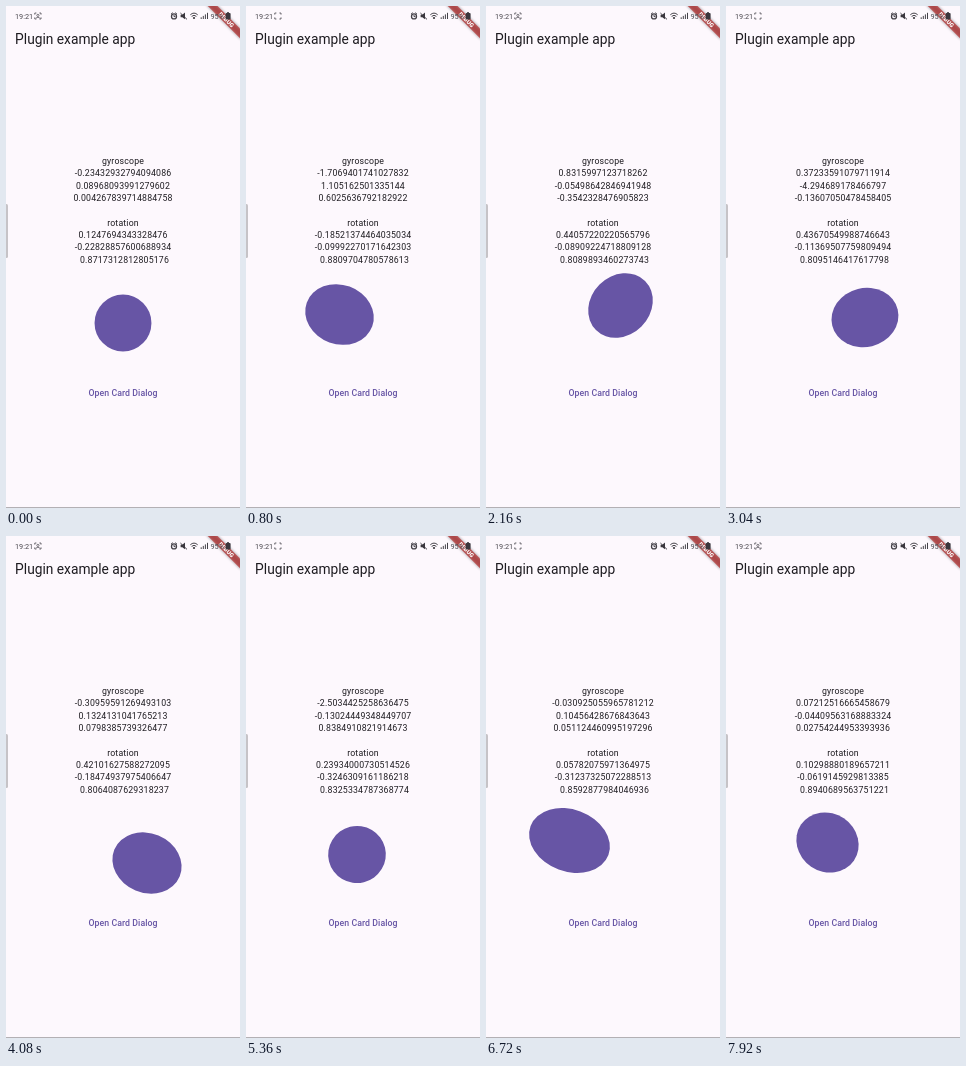
Animation, 234 px wide and 502 px high, one loop 8000 ms. Source, as an HTML page:

```html
<!DOCTYPE html>
<html lang="en">
<head>
<meta charset="utf-8">
<title>Plugin example app</title>
<style>
  html, body { margin: 0; width: 100%; height: 100%; overflow: hidden; background: #fdf8fd; }
  svg { display: block; width: 100vw; height: 100vh; font-family: Roboto, "Liberation Sans", sans-serif; }
  .body { font-size: 8.76px; letter-spacing: .17px; text-anchor: middle; fill: #1d1b20; }
  .status { font-size: 7.3px; fill: #4b484f; }
  .icon { fill: none; stroke: #454249; stroke-width: 1; }
  .solid { fill: #3a373d; }
</style>
</head>
<body>
<svg viewBox="0 0 234 502">
  <defs>
    <filter id="soft" x="-20%" y="-80%" width="140%" height="260%"><feGaussianBlur stdDeviation="1.5"/></filter>
  </defs>
  <rect width="234" height="502" fill="#fdf8fd"/>

  <text x="9.1" y="37.7" font-size="13.77" fill="#1d1b20">Plugin example app</text>
  <g id="lines"></g>
  <circle id="ball" r="28.45" fill="#6755a5"/>
  <text x="117" y="390.4" font-size="8.76" font-weight="500" letter-spacing=".057" text-anchor="middle" fill="#6755a5">Open Card Dialog</text>

  <!-- corner ribbon -->
  <g transform="translate(234 0) rotate(45)">
    <rect x="-24" y="15.9" width="48" height="6.9" opacity=".4" filter="url(#soft)"/>
    <rect x="-24" y="15.9" width="48" height="6.9" fill="#b71c1c" opacity=".63"/>
    <text y="21.4" font-size="5.8" font-weight="900" text-anchor="middle" fill="#fff">DEBUG</text>
  </g>

  <!-- status bar, above the app -->
  <text class="status" x="9" y="12.7">19:21</text>
  <text class="status" x="204.4" y="12.7">95%</text>
  <g class="icon">
    <path d="M30.4 7H28.8V8.6M28.8 11.4V13H30.4M33.4 7H35V8.6M35 11.4V13H33.4" stroke-width=".8"/>
    <g id="rec" stroke-width=".7"><circle cx="31.9" cy="9.4" r="1.1"/><path d="M30 12Q31.9 10.6 33.8 12"/></g>
    <circle cx="168" cy="10.4" r="2.5" stroke-width="1.3"/>
    <path d="M168 9V10.6H169.4M165 8.2L166.7 6.7M171 8.2L169.3 6.7M174.4 7L181 13.4"/>
    <path d="M184.3 8.8Q188 5.4 191.7 8.8M185.6 10.4Q188 8.2 190.4 10.4"/>
    <path d="M195.2 13V11.3M197.3 13V9.9M199.4 13V8.4M201.5 13V6.8"/>
  </g>
  <g class="solid">
    <path d="M174.6 8.8H176.3L179 6.6V13.2L176.3 11.2H174.6Z"/>
    <circle cx="188" cy="12" r="1.1"/>
    <rect x="219.6" y="7" width="5" height="6.4" rx="1"/>
    <rect x="221" y="6.2" width="2" height="1"/>
  </g>

  <rect x="-2" y="198" width="4" height="54" rx="1.5" fill="#c6c3c7"/>
  <rect y="501" width="234" height="1" fill="#b3b0b4"/>
</svg>
<script>
const LOOP = 8000, STEP = 80;
const X = 1, Y = 2, TILT_X = 3, TILT_Y = 4;

// time, ball offset x y, tilt x y; the phone rests from 4800 to 5120
const keys = [
  [0, 0, 0, .125, -.228],
  [800, -23.5, -8.5, -.185, -.1],
  [1200, -28, -10, -.2, -.09],
  [2160, 17.5, -17.5, .441, -.089],
  [4080, 24, 10, .421, -.185],
  [4800, 0, 0, .3, -.32],
  [5120, 0, 0, .3, -.32],
  [5360, -6, 1.5, .239, -.325],
  [6720, -33.5, -12.5, .058, -.312],
  [7920, -15.5, -10.5, .103, -.062]
];

const svgNS = 'http://www.w3.org/2000/svg';
const ball = document.getElementById('ball');
const rec = document.getElementById('rec');
const lines = document.getElementById('lines');

function addLine(row, text = '', shift = 0) {
  const el = document.createElementNS(svgNS, 'text');
  el.setAttribute('class', 'body');
  el.setAttribute('x', 117 + shift);
  el.setAttribute('y', 158 + row * 12.33);
  el.textContent = text;
  lines.append(el);
  return el;
}

addLine(0, 'gyroscope');
addLine(5, 'rotation');
const fields = [1, 2, 3, 6, 7, 8].map(row => addLine(row, '', row === 8 ? 1.5 : 0));

function noise(n, i) {
  const v = Math.sin(n * 12.9898 + i * 78.233) * 43758.5453;
  return (v - Math.floor(v)) * 2 - 1;
}

// slope at a key, flat at turning points
function slope(i, c) {
  const a = keys[i - 1], b = keys[i], d = keys[i + 1];
  if (!a || !d) return 0;
  const s0 = (b[c] - a[c]) / (b[0] - a[0]), s1 = (d[c] - b[c]) / (d[0] - b[0]);
  return s0 * s1 <= 0 ? 0 : 2 * s0 * s1 / (s0 + s1);
}

function curve(t, c) {
  const next = keys.findIndex(k => k[0] > t);
  const i = next < 0 ? keys.length - 2 : Math.max(0, next - 1);
  const a = keys[i], b = keys[i + 1], h = b[0] - a[0];
  const u = Math.min(1, Math.max(0, (t - a[0]) / h)), v = 1 - u;
  return a[c] * (1 + 2 * u) * v * v + b[c] * u * u * (3 - 2 * u)
    + h * u * v * (v * slope(i, c) - u * slope(i + 1, c));
}

const rate = (t, c) => (curve(t + STEP / 2, c) - curve(t - STEP / 2, c)) / STEP;

// turning speed follows the ball; both readings carry sensor jitter
function readings(t) {
  const x = curve(t, TILT_X), y = curve(t, TILT_Y);
  const spin = rate(t, X) * 100;
  const gyro = [spin, rate(t, Y) * -200, spin * -.35];
  const tilt = [x, y, .9 - .45 * x * x - .4 * y * y];
  return [...gyro, ...tilt].map((v, i) =>
    Math.fround(v + noise(t / STEP, i) * (i < 3 ? .06 : .0005)));
}

function moveBall(t) {
  const x = curve(t, X), y = curve(t, Y), d = x * x + y * y;
  const angle = Math.atan2(y, x) * 180 / Math.PI;
  ball.setAttribute('transform',
    `translate(${117 + x} ${317 + y}) rotate(${angle}) scale(${1 + d * .00036} ${1 + d * .00007})`);
}

function draw() {
  const t = Math.floor(performance.now() % LOOP / STEP) * STEP;
  const resting = t > 4800 && t < 5120;
  const shown = readings(resting ? 4960 - (t < 4960 ? 2 * STEP : 0) : t);
  fields.forEach((el, i) => { el.textContent = shown[i]; });
  moveBall(t);
  rec.style.display = (t + 500) % 2000 < 1000 ? '' : 'none';
  requestAnimationFrame(draw);
}
draw();
</script>
</body>
</html>
```
